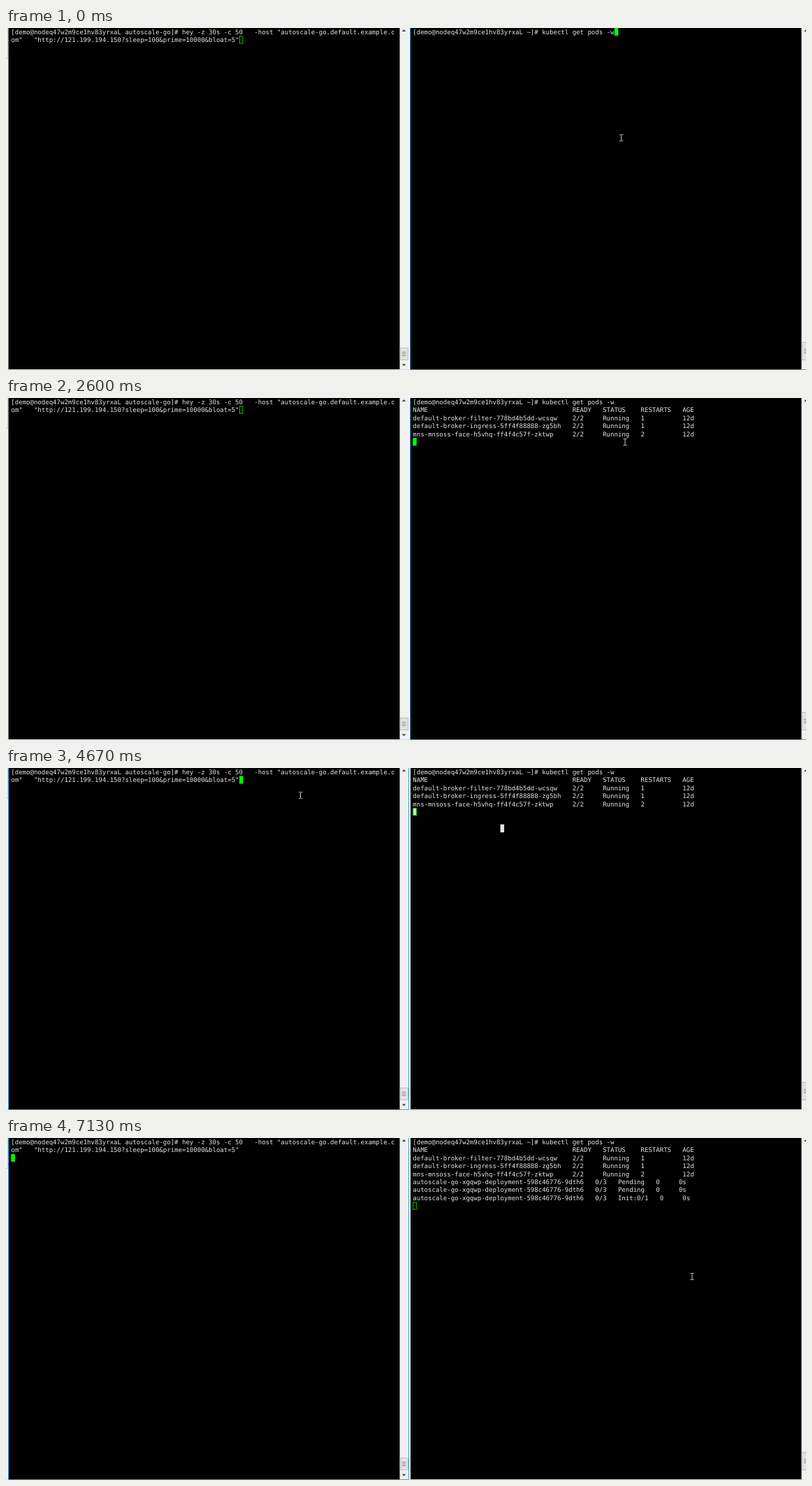
Animation of 1145 by 489 pixels, one loop 8000 ms. Source, as an HTML page:

```html
<!DOCTYPE html>
<html lang="en">
<head>
<meta charset="utf-8">
<title>Two terminals</title>
<style>
html, body { margin: 0; height: 100%; overflow: hidden; background: #000; }
svg { display: block; width: 100vw; height: 100vh; }
text {
  font: 9.042px "DejaVu Sans Mono", monospace;
  fill: #e5e5e5;
  white-space: pre;
  text-rendering: geometricPrecision;
}
#mouse { fill: none; stroke: #ddd; stroke-width: .9; mix-blend-mode: difference; }
</style>
</head>
<body>
<svg viewBox="0 0 1145 489" preserveAspectRatio="none">
  <defs>
    <path id="arrow" d="M-2.7 1.5h5.4L0 -1.5z" fill="#444"/>
    <path id="grip" d="M-2.8 -2.5h5.6M-2.8 0h5.6M-2.8 2.5h5.6" stroke="#777" stroke-width=".8"/>
  </defs>
  <rect width="1145" height="489"/>

  <rect width="3.5" height="489" fill="#f0f0f0"/>
  <path d="M0 43.5h2.5V0" fill="none" stroke="#bbb" stroke-width=".7"/>
  <rect x="563.5" width="12.5" height="489" fill="#f0f0f0"/>
  <rect x="576" width="3" height="489" fill="#f7f7f7"/>
  <rect x="564" y="457.5" width="11.5" height="17" rx="1" fill="#e2e2e2" stroke="#aaa" stroke-width=".7"/>
  <use href="#grip" x="569.5" y="466"/>
  <use href="#arrow" x="569.5" y="3.5"/>
  <use href="#arrow" transform="translate(569.5 482) scale(1 -1)"/>

  <rect x="1138.5" width="7" height="489" fill="#f0f0f0"/>
  <rect x="1139" y="449.5" width="11.5" height="25" rx="1" fill="#e2e2e2" stroke="#aaa" stroke-width=".7"/>
  <use href="#grip" x="1144.8" y="462"/>
  <use href="#arrow" x="1144.8" y="3.5"/>

  <path d="M0 488.5H1145" stroke="#ddd" stroke-width="1"/>
  <path id="leftEdge" d="M3.5 0V488.5H576.5V0" fill="none" stroke="#3aa0e0"/>
  <path id="rightEdge" d="M578.5 0V488.5H1145" fill="none" stroke="#3aa0e0"/>

  <g id="left"></g>
  <g id="right"></g>
  <rect id="block" fill="#e5e5e5"/>
  <rect id="leftCursor"/>
  <rect id="rightCursor"/>
  <path id="mouse" d="M-2.6 -4.6H-.8L0 -4L.8 -4.6H2.6M0 -4V4M-2.6 4.6H-.8L0 4L.8 4.6H2.6"/>
</svg>
<script>
const CELL_W = 5.444, CELL_H = 11.43, LEFT = 7.3, RIGHT = 582.3;
const $ = id => document.getElementById(id);
const set = (el, attrs) => { for (const k in attrs) el.setAttribute(k, attrs[k]); };

const HOST = "[demo@nodeq47w2m9ce1hv83yrxaL ";
const POD = "autoscale-go-xgqwp-deployment-598c46776-9dth6   0/3   ";
const row = (name, ready, status, restarts, age) =>
  name.padEnd(42) + ready.padEnd(8) + status.padEnd(10) + restarts.padEnd(11) + age;

// Each line: time it appears, text
const leftLines = [
  [0, HOST + 'autoscale-go]# hey -z 30s -c 50   -host "autoscale-go.default.example.c'],
  [0, 'om"   "http://121.199.194.150?sleep=100&prime=10000&bloat=5"']
];
const rightLines = [
  [0, HOST + "~]# kubectl get pods -w"],
  [2600, row("NAME", "READY", "STATUS", "RESTARTS", "AGE")],
  [2600, row("default-broker-filter-778bd4b5dd-wcsqw", "2/2", "Running", "1", "12d")],
  [2600, row("default-broker-ingress-5ff4f88888-zg5bh", "2/2", "Running", "1", "12d")],
  [2600, row("mns-mnsoss-face-h5vhq-ff4f4c57f-zktwp", "2/2", "Running", "2", "12d")],
  [6200, POD + "Pending   0     0s"],
  [6200, POD + "Pending   0     0s"],
  [6270, POD + "Init:0/1   0     0s"]
];

// Mouse path: time, x, y
const path = [
  [0, 880.5, 157], [333, 870, 105], [600, 874, 81],
  [867, 874, 81], [1133, 886, 63],
  [3067, 886, 63], [3133, 894, 64], [3333, 735, 85], [3467, 712.5, 89],
  [4133, 712, 89], [4200, 630, 74], [4267, 530, 56], [4333, 470, 46], [4400, 435, 41], [4533, 421.5, 39],
  [4867, 421.5, 39], [5067, 342, 81],
  [6800, 342, 81], [6933, 690, 146], [7067, 950, 192], [7133, 982, 198],
  [8000, 982, 198]
];

function print(group, x, lines) {
  return lines.map(([at, words], i) => {
    const el = document.createElementNS("http://www.w3.org/2000/svg", "text");
    set(el, { x, y: i * CELL_H + 8.85 });
    el.textContent = words;
    group.append(el);
    return { el, at };
  });
}
const printed = [...print($("left"), LEFT, leftLines), ...print($("right"), RIGHT, rightLines)];

function cursor(el, x, col, line, solid, inside = "none") {
  const inset = solid ? 0 : .45;
  set(el, {
    x: x + col * CELL_W + inset, y: line * CELL_H + inset,
    width: CELL_W - 2 * inset, height: CELL_H - .4 - 2 * inset,
    fill: solid ? "#0f0" : inside, stroke: solid ? "none" : "#00e000", "stroke-width": .9
  });
}

function mouseAt(t) {
  const i = Math.max(1, path.findIndex(p => p[0] >= t));
  const [t0, x0, y0] = path[i - 1], [t1, x1, y1] = path[i];
  const k = (t - t0) / (t1 - t0);
  return [x0 + (x1 - x0) * k, y0 + (y1 - y0) * k];
}

set($("block"), { x: RIGHT + 23 * CELL_W, y: 7 * CELL_H + .6, width: CELL_W, height: CELL_H });

function draw(now) {
  const t = now % 8000;
  // The screen refreshes 15 times a second
  const tick = Math.floor(t * .015 + .06) / .015;
  const since = at => tick + 5 >= at;
  const show = (el, on) => { el.style.display = on ? "" : "none"; };

  for (const { el, at } of printed) show(el, since(at));

  const leftFocus = since(4600), selected = since(4000) && !since(6200);
  show($("leftEdge"), leftFocus);
  show($("rightEdge"), !leftFocus);
  show($("block"), selected);

  const entered = since(6130);
  cursor($("leftCursor"), LEFT, entered ? 0 : 60, entered ? 2 : 1, leftFocus);

  const typed = !since(2470);
  const line = typed ? 0 : !since(2600) ? 1 : !since(6200) ? 5 : !since(6270) ? 7 : 8;
  cursor($("rightCursor"), RIGHT, typed ? 53 : 0, line, !leftFocus, selected ? "#d0e8d0" : "none");

  $("mouse").setAttribute("transform", `translate(${mouseAt(Math.min(tick, 8000))})`);
}

let start;
function loop(now) {
  start ??= now;
  draw(now - start);
  requestAnimationFrame(loop);
}
draw(0);
requestAnimationFrame(loop);
</script>
</body>
</html>
```
